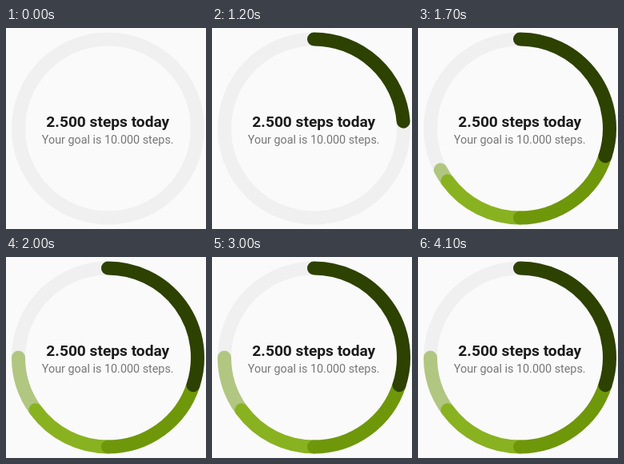
Recreate the animation shown at these times as an HTML page. Size 250 px wide and 252 px high, loop 4200 ms.

```html
<!DOCTYPE html>
<html lang="en">
<head>
<meta charset="utf-8">
<title>Step goal ring</title>
<style>
  html, body { margin: 0; width: 100%; height: 100%; overflow: hidden; background: #fafafa; }
  svg { display: block; width: 250px; height: 252px; }
  .ring { fill: none; stroke-width: 17; stroke-linecap: round; }
  text { font-family: Roboto, sans-serif; text-anchor: middle; }
  .title { font-size: 19.15px; font-weight: 700; fill: #1b1b1b; }
  .goal { font-size: 14.35px; fill: #777; }
</style>
</head>
<body>
<svg viewBox="0 0 250 252">
  <circle class="ring" cx="127.5" cy="126" r="112" stroke="#f0f0f0"/>
  <g id="segments"></g>
  <text class="title" x="127.3" y="124">2.500 steps today</text>
  <text class="goal" x="127.2" y="145">Your goal is 10.000 steps.</text>
</svg>
<script>
  const LOOP = 4200, TICK = 100, FIRST_TICK = 1100;
  const START = 997, DURATION = 990;
  const CX = 127.5, CY = 126, R = 112;

  // Shares of the full circle; later segments lie underneath earlier ones.
  const segments = [
    { from: 0, to: 0.3, color: '#2d4100' },
    { from: 0.3, to: 0.5, color: '#6f970a' },
    { from: 0.5, to: 0.65, color: '#89b221' },
    { from: 0.65, to: 0.75, color: '#b1c681' }
  ];
  const total = segments[segments.length - 1].to;

  const group = document.getElementById('segments');
  for (const segment of segments) {
    const path = document.createElementNS('http://www.w3.org/2000/svg', 'path');
    path.setAttribute('class', 'ring');
    path.setAttribute('stroke', segment.color);
    group.prepend(path);
    segment.path = path;
  }

  function point(share) {
    const angle = share * 2 * Math.PI;
    return `${CX + R * Math.sin(angle)} ${CY - R * Math.cos(angle)}`;
  }

  function arc(from, to) {
    return `M${point(from)}A${R} ${R} 0 ${to - from > 0.5 ? 1 : 0} 1 ${point(to)}`;
  }

  function progress(time) {
    if (time < FIRST_TICK) return 0;
    const t = Math.min((time - START) / DURATION, 1);
    return total * Math.sin(t * Math.PI / 2);
  }

  function draw(now) {
    const time = Math.floor((now % LOOP) / TICK) * TICK;
    const reached = progress(time);
    for (const { from, to, path } of segments) {
      path.setAttribute('d', reached > from ? arc(from, Math.min(to, reached)) : '');
    }
  }

  const begin = performance.now();
  function frame() {
    draw(performance.now() - begin);
    requestAnimationFrame(frame);
  }
  frame();
</script>
</body>
</html>
```
